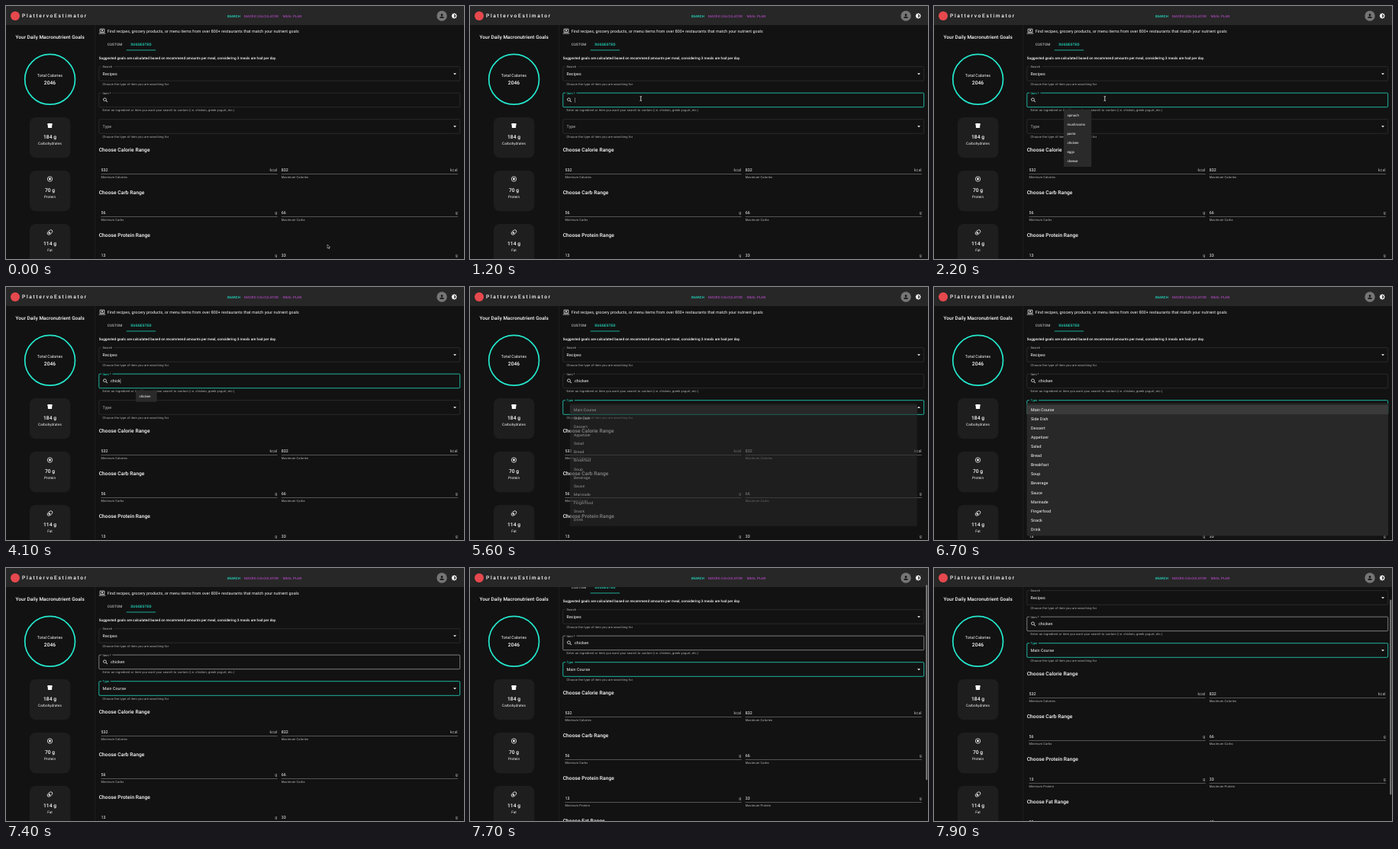
An HTML page that plays this animation: 600x332 px, repeating every 8 s.

```html
<!DOCTYPE html>
<html lang="en">
<head>
<meta charset="utf-8">
<title>Nutrition search</title>
<style>
html, body { margin: 0; width: 100%; height: 100%; overflow: hidden; background: #121212; }
svg { display: block; width: 600px; height: 332px; font-family: Roboto, Arial, sans-serif; text-rendering: geometricPrecision; }
text { white-space: pre; }
</style>
</head>
<body>
<svg id="stage" viewBox="0 0 600 332"></svg>
<script>
const BG = '#121212', WHITE = '#fff', SOFT = '#b8b8b8', DIM = '#474747', TEAL = '#24e8cd', PURPLE = '#ab47bc';
const SPACING = { 12: .0333, 13: .0286, 14: .0107, 16: .0094, 20: .0075 };
const FOODS = ['spinach', 'mushrooms', 'pasta', 'chicken', 'eggs', 'cheese'];
const TYPES = ['Main Course', 'Side Dish', 'Dessert', 'Appetizer', 'Salad', 'Bread', 'Breakfast', 'Soup',
  'Beverage', 'Sauce', 'Marinade', 'Fingerfood', 'Snack', 'Drink'];
const ICONS = {
  search: 'M15.5 14h-.79l-.28-.27C15.41 12.59 16 11.11 16 9.5 16 5.91 13.09 3 9.5 3S3 5.91 3 9.5 5.91 16 9.5 16c1.61 0 3.09-.59 4.23-1.57l.27.28v.79l5 4.99L20.49 19l-4.99-5zm-6 0C7.01 14 5 11.99 5 9.5S7.01 5 9.5 5 14 7.01 14 9.5 11.99 14 9.5 14z',
  theme: 'M20 8.69V4h-4.69L12 .69 8.69 4H4v4.69L.69 12 4 15.31V20h4.69L12 23.31 15.31 20H20v-4.69L23.31 12 20 8.69zM12 18c-.89 0-1.74-.2-2.5-.55C11.56 16.5 13 14.42 13 12s-1.44-4.5-3.5-5.45C10.26 6.2 11.11 6 12 6c3.31 0 6 2.69 6 6s-2.69 6-6 6z',
  bread: 'M18 3H6C3.79 3 2 4.79 2 7c0 1.48.81 2.75 2 3.45V19c0 1.1.9 2 2 2h12c1.1 0 2-.9 2-2v-8.55c1.19-.69 2-1.97 2-3.45 0-2.21-1.79-4-4-4z',
  person: 'M12 12c2.21 0 4-1.79 4-4s-1.79-4-4-4-4 1.79-4 4 1.79 4 4 4zm0 2c-2.67 0-8 1.34-8 4v2h16v-2c0-2.66-5.33-4-8-4z'
};

const stage = document.getElementById('stage');
const pen = document.createElement('canvas').getContext('2d');
const clamp = v => Math.min(1, Math.max(0, v));
const mix = (a, b, u) => a + (b - a) * u;

// cubic-bezier(x1, 0, .2, 1)
function ease(x, x1 = .4) {
  x = clamp(x);
  let lo = 0, hi = 1, s = .5;
  for (let i = 0; i < 20; i++, s = (lo + hi) / 2) {
    const at = 3 * (1 - s) ** 2 * s * x1 + .6 * (1 - s) * s * s + s ** 3;
    if (at < x) lo = s; else hi = s;
  }
  return 3 * (1 - s) * s * s + s ** 3;
}

// Type sizes are in CSS px of a page shown at one third scale.
function width(s, size) {
  pen.font = '100px Roboto, Arial, sans-serif';
  return (pen.measureText(s).width / 100 + (SPACING[size] || 0) * s.length) * size / 3;
}
const text = (x, y, s, size = 16, fill = WHITE, extra = '', gap = (SPACING[size] || 0)) =>
  `<text x="${x}" y="${y}" font-size="${size / 3}" fill="${fill}" letter-spacing="${gap * size / 3}" ${extra}>${s}</text>`;
const rect = (x, y, w, h, fill, extra = '') =>
  `<rect x="${x}" y="${y}" width="${w}" height="${h}" fill="${fill}" ${extra}/>`;
const icon = (name, cx, cy, fill = WHITE) =>
  `<path transform="translate(${cx - 4} ${cy - 4}) scale(.3333)" d="${ICONS[name]}" fill="${fill}"/>`;
const MID = 'text-anchor="middle"', END = 'text-anchor="end"', BOLD = 'font-weight="500"';

// Outlined field; float is 1 when the label sits on the border.
function field(y, label, help, state, float = 1) {
  const size = mix(16, 12, float), focus = state === 'focus';
  const color = focus ? TEAL : state === 'hover' ? WHITE : DIM;
  return rect(121.8, y, 472.9, 18.6, 'none', `rx="1.3" stroke="${color}" stroke-width="${focus ? .75 : .45}"`) +
    (float > .3 ? rect(125, y - 1, width(label, 12) + 3, 2, BG) : '') +
    text(126.6, mix(y + 11.2, y + 1.4, float), label, size, focus ? TEAL : SOFT, '', .01) +
    text(126.6, y + 24.1, help, 12, SOFT);
}
const arrow = (y, up) => `<path d="M586 ${y + (up ? .8 : -.8)}h4l-2 ${up ? -2 : 2}z" fill="#fff"/>`;

function range(i, name, unit, low, high) {
  const y = 56 * i, plural = name === 'Calorie' ? 'Calories' : name === 'Carb' ? 'Carbs' : name;
  const half = (x, word, value) =>
    text(x, y + 217, value) + text(x + 231, y + 217, unit, 16, SOFT, END) +
    rect(x, y + 220.1, 231.3, .4, SOFT) + text(x, y + 226, `${word} ${plural}`, 12, SOFT);
  return text(121.7, y + 190.5, `Choose ${name} Range`, 20, WHITE, BOLD) +
    half(124.4, 'Minimum', low) + half(360.7, 'Maximum', high);
}

function card(i, amount, label, art) {
  const y = 70 * i;
  return rect(31, y + 146, 53.3, 53.3, '#1e1e1e', 'rx="8"') + art +
    text(57.5, y + 174, amount, 20, WHITE, `${MID} ${BOLD}`) + text(57.5, y + 182.3, label, 14, WHITE, MID);
}

const outline = 'fill="none" stroke="#fff" stroke-width=".75"';
const sidebar = rect(0, 25, 116, 307, BG) + rect(116, 25, .4, 307, '#333') +
  text(57.7, 43.4, 'Your Daily Macronutrient Goals', 19.2, WHITE, `${MID} ${BOLD}`, .0075) +
  `<circle cx="57.6" cy="96.3" r="32.9" fill="none" stroke="${TEAL}" stroke-width="1.7"/>` +
  text(57.5, 92.8, 'Total Calories', 16, WHITE, MID) + text(57.5, 102.7, '2046', 20, WHITE, `${MID} ${BOLD}`) +
  card(0, '184 g', 'Carbohydrates', icon('bread', 57.5, 157)) +
  card(1, '70 g', 'Protein', `<circle cx="57.5" cy="227" r="3.2" ${outline}/><circle cx="57.5" cy="227" r="1.4" fill="#fff"/>`) +
  card(2, '114 g', 'Fat', `<g transform="rotate(-42 57.5 297)"><ellipse cx="57.5" cy="297" rx="3.9" ry="2.3" ${outline}/><circle cx="56.6" cy="297" r="1.2" fill="#fff"/></g>`);

const header = rect(0, 0, 600, 25, '#272727') + '<circle cx="12" cy="13" r="6" fill="#e5484d"/>' +
  text(21, 15.4, 'PlattervoEstimator', 20, WHITE, BOLD, .25) +
  text(289.7, 14.6, 'SEARCH', 13, TEAL, BOLD) +
  text(312, 14.6, 'MACRO CALCULATOR', 13, PURPLE, BOLD) +
  text(362.8, 14.6, 'MEAL PLAN', 13, PURPLE, BOLD) +
  '<circle cx="571" cy="13" r="6.7" fill="#757575"/>' + icon('person', 571, 13, BG) + icon('theme', 587.2, 13);

const intro = `<path d="M123.2 30.2h5.6v4.2h-5.6zM121.8 36h8.4" ${outline}/><circle cx="126" cy="32.3" r="1" fill="#fff"/>` +
  text(132.7, 35.1, 'Find recipes, grocery products, or menu items from over 800+ restaurants that match your nutrient goals') +
  text(142.6, 52.2, 'CUSTOM', 14, SOFT, `${MID} ${BOLD}`, .0286) +
  text(177, 52.2, 'SUGGESTED', 14, TEAL, `${MID} ${BOLD}`, .0286) + rect(157.7, 57.6, 38.4, .7, TEAL) +
  text(121.7, 69.6, 'Suggested goals are calculated based on recommend amounts per meal, considering 3 meals are had per day.', 14, WHITE, BOLD, .0071);

const ranges = range(0, 'Calorie', 'kcal', 532, 832) + range(1, 'Carb', 'g', 56, 66) +
  range(2, 'Protein', 'g', 13, 33) + range(3, 'Fat', 'g', 38, 48);

function suggestions(typed) {
  const list = FOODS.filter(s => s.startsWith(typed));
  const w = Math.max(...list.map(s => width(s, 13.3))) + 12.5;
  return '<path d="M175 137l3.2-3.2 3.2 3.2z" fill="#2a2a2a"/>' +
    rect(170, 136, w, list.length * 12.06 + 2.6, '#2a2a2a', 'rx="1"') +
    list.map((s, i) => text(174.4, 145 + 12.06 * i, s, 13.3)).join('');
}

function menu(t) {
  const closing = t >= 6880, age = closing ? t - 6880 : t - 5465;
  const grow = closing ? 1 - ease((age - 120) / 240) : ease(age / 240);
  const opacity = closing ? 1 - ease(age / 361) : ease(age / 361);
  const k = .75 + .25 * grow, active = t >= 6200 && t < 6700 ? 1 : 0;
  return `<g opacity="${opacity}" transform="translate(358 158) scale(${k} ${k * k}) translate(-358 -158)">` +
    rect(121.6, 152.6, 473.4, 174, '#282828', 'rx="1.3"') +
    rect(121.6, 155 + 12.07 * active, 473.4, 12.07, '#3a3a3a') +
    TYPES.map((s, i) => text(127, 162.9 + 12.07 * i, s)).join('') + '</g>';
}

function pointer(t, x, y) {
  if (t >= 3700) return '';
  return t < 1000
    ? `<path transform="translate(${x} ${y})" d="M0 0v5l1.2-1.1.8 1.8.8-.4-.8-1.7h1.6z" fill="#000" stroke="#fff" stroke-width=".45"/>`
    : `<path d="M222.6 118.5q1 0 1.2.7.2-.7 1.2-.7M223.8 119v5M222.6 124.5q1 0 1.2-.7.2.7 1.2.7" ${outline}/>`;
}

function draw(t) {
  const go = clamp(t / 900), move = go * go * (3 - 2 * go);
  const px = mix(421, 223.5, move), py = mix(313, 118.5, move);
  const typed = 'chicken'.slice(0, t < 3700 ? 0 : t < 4400 ? Math.min(5, (t - 3600) / 100) : t < 4500 ? 6 : 7);
  const inItem = t >= 1200 && t < 4700, inType = t >= 4700;
  const over = y => t < 1200 && py > y && py < y + 18.6 ? 'hover' : '';
  const open = t >= 5465 && t < 6880, chosen = t >= 6880;
  const caret = inItem && (t < 2200 || t >= 3700 || t >= 2700 && t < 3200);
  const run = clamp((t - 7500) / 400), scroll = 50 * run * run * (3 - 2 * run);
  const pick = 'Choose the type of item you are searching for';

  const form =
    field(79.6, 'Search', pick, over(79.6)) + text(126.6, 90.9, 'Recipes') + arrow(89, false) +
    field(114.1, 'Item *', 'Enter an ingredient or item you want your search to contain (i.e. chicken, greek yogurt, etc.)',
      inItem ? 'focus' : t >= 7300 ? 'hover' : over(114.1)) +
    icon('search', 130.3, 123.5) + text(137, 125.4, typed) +
    (caret ? rect(137 + width(typed, 16), 120.3, .4, 6.4, WHITE) : '') +
    field(148.7, 'Type', pick, inType ? 'focus' : over(148.7), ease((t - 4650) / 200, 0)) +
    (chosen ? text(126.6, 160, 'Main Course') : '') + arrow(158, open);

  stage.innerHTML = `<g transform="translate(0 ${-scroll})">${intro}${form}${ranges}</g>` + sidebar + header +
    (t >= 1400 && t < 4500 ? suggestions(typed) : '') +
    (t >= 5465 && t < 7245 ? menu(t) : '') +
    (scroll ? rect(597.2, 3 + scroll * .772, 2.1, 256, '#7c7c7c', 'rx="1"') : '') +
    pointer(t, px, py);
}

let last = -1;
function tick(now) {
  const t = Math.floor(now % 8000 / 100) * 100;
  if (t !== last) draw(last = t);
  requestAnimationFrame(tick);
}
draw(0);
requestAnimationFrame(tick);
</script>
</body>
</html>
```
